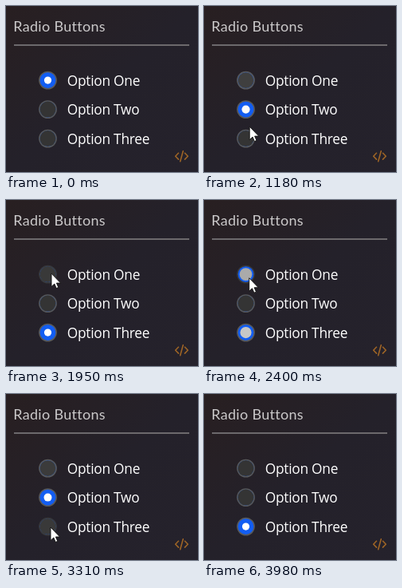
These frames come from a looping animation (241 px wide and 208 px high, 4.24 s). An HTML page:

```html
<!DOCTYPE html>
<html lang="en">
<head>
<meta charset="utf-8">
<title>Radio Buttons</title>
<style>
  html, body { margin: 0; width: 100%; height: 100%; overflow: hidden; background: #24212a; }
  svg { display: block; width: 241px; height: 208px; }
  .title { font: 18px Lato, sans-serif; letter-spacing: .3px; fill: #cbc9ca; }
  .option { font: 17.3px "Open Sans", "Noto Sans", sans-serif; letter-spacing: -.25px; fill: #fff; }
</style>
</head>
<body>
<svg viewBox="0 0 241 208">
  <defs>
    <linearGradient id="backdrop" x1="0" y1="0" x2="1" y2="1">
      <stop offset="0" stop-color="#281f21"/>
      <stop offset=".5" stop-color="#24212a"/>
      <stop offset="1" stop-color="#25222c"/>
    </linearGradient>
  </defs>
  <rect width="241" height="208" fill="url(#backdrop)"/>
  <text class="title" x="9.3" y="32">Radio Buttons</text>
  <path d="M10 49H230" stroke="#6c696c" stroke-width="2"/>
  <g id="options"></g>
  <path d="M216.5 184.3L212.7 188.2L216.5 192.1M224.5 184.3L228.3 188.2L224.5 192.1M222.3 181.8L218.7 194.8"
        fill="none" stroke="#9d6426" stroke-width="1.6" stroke-linecap="round" stroke-linejoin="round"/>
  <circle id="press" cx="-1" cy="-1" r="15" fill="#e6dc10" opacity=".62"/>
  <path id="cursor" d="M0 0V16.5L3.8 13L6.2 18.5L8.8 17.4L6.4 12H11.5Z" fill="#fff" stroke="#111" stroke-width=".9"/>
</svg>
<script>
const LOOP = 4240, FADE = 350, PRESS = 100, REST = 20;
const LABELS = ["Option One", "Option Two", "Option Three"];
const CENTER_X = 52.5;
const rowY = row => 93.1 + 36.5 * row;

const $ = id => document.getElementById(id);
const clamp = v => Math.max(0, Math.min(1, v));
const mix = (a, b, p) => a + (b - a) * p;
const smooth = u => u * u * (3 - 2 * u);
const easeOut = u => 1 - (1 - u) ** 2;
const easeIn = u => u ** 3;

// The pointer enters, clicks one option per stop and leaves.
const ENTER = { x: 166, y: 206, leave: 130 };
const STOPS = [
  { row: 1, x: 58, y: 122, arrive: 610, press: 780, ease: easeOut },
  { row: 2, x: 57, y: 159, arrive: 1300, press: 1415 },
  { row: 0, x: 57, y: 92, arrive: 1960, press: 2180 },
  { row: 1, x: 55, y: 128, arrive: 2700, press: 2900 },
  { row: 2, x: 56, y: 167, arrive: 3280, press: 3390 }
];
const EXIT = { x: 190, y: 209, arrive: 3980, ease: easeIn };

for (const stop of STOPS) {
  stop.release = stop.press + PRESS;
  stop.leave = stop.release + REST;
}

function pointer(t) {
  if (t < ENTER.leave || t >= EXIT.arrive) return null;
  let from = ENTER;
  for (const to of [...STOPS, EXIT]) {
    if (t < to.arrive) {
      const ease = to.ease || smooth;
      const p = ease(clamp((t - from.leave) / (to.arrive - from.leave)));
      return { x: mix(from.x, to.x, p), y: mix(from.y, to.y, p) };
    }
    from = to;
  }
}

function checkedAmount(row, t) {
  let selected = 0, amount = row === 0 ? 1 : 0;
  for (const stop of STOPS) {
    if (t < stop.release) break;
    const u = clamp((t - stop.release) / FADE);
    if (stop.row === row) amount = easeOut(u);
    else amount = selected === row ? 1 - smooth(u) : 0;
    selected = stop.row;
  }
  return amount;
}

function add(tag, attrs) {
  const node = document.createElementNS("http://www.w3.org/2000/svg", tag);
  for (const key in attrs) node.setAttribute(key, attrs[key]);
  return $("options").appendChild(node);
}

const radios = LABELS.map((label, row) => {
  const y = rowY(row), center = { cx: CENTER_X, cy: y };
  const rim = add("circle", { ...center, r: 11.4 });
  add("circle", { ...center, r: 9.9, fill: "#125df2" });
  const dot = add("circle", center);
  add("text", { class: "option", x: 76.8, y: y + 6.7 }).textContent = label;
  return { rim, dot, y };
});

function render(t) {
  const tip = pointer(t);
  radios.forEach(({ rim, dot, y }, row) => {
    const checked = checkedAmount(row, t);
    const hover = tip && Math.hypot(tip.x - CENTER_X, tip.y - y) < 11.5;
    const tone = Math.round(mix(hover ? 57 : 52, 255, checked));
    rim.setAttribute("fill", hover ? "#39393b" : "#58595b");
    dot.setAttribute("fill", `rgb(${tone},${tone},${tone})`);
    dot.setAttribute("r", 4.6 + 5.4 * (1 - checked) ** 0.6);
  });

  const pressed = STOPS.some(stop => t >= stop.press && t < stop.release);
  $("cursor").style.display = tip ? "" : "none";
  $("press").style.display = pressed ? "" : "none";
  if (tip) {
    const place = `translate(${tip.x} ${tip.y})`;
    $("cursor").setAttribute("transform", place);
    $("press").setAttribute("transform", place);
  }
}

const start = performance.now();
function tick() {
  render((performance.now() - start) % LOOP);
  requestAnimationFrame(tick);
}
tick();
</script>
</body>
</html>
```
